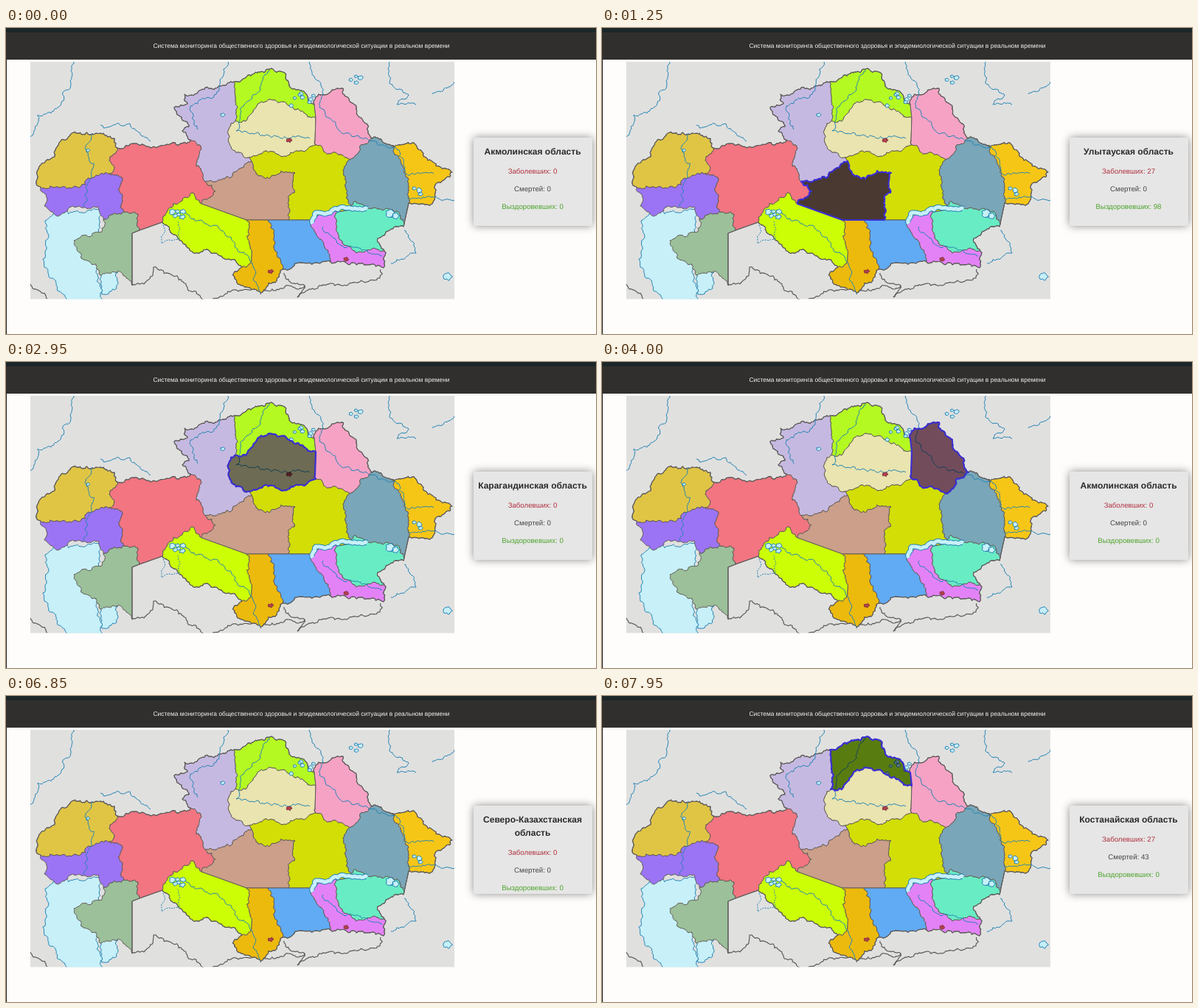
Recreate the animation shown at these times as an HTML page. Size 800x416 px, loop 8000 ms.

```html
<!DOCTYPE html>
<html lang="ru">
<head>
<meta charset="utf-8">
<style>
html, body { margin: 0; width: 100%; height: 100%; overflow: hidden; background: #fefdfc; }
svg { display: block; width: 800px; height: 416px; }
text { font-family: "Liberation Sans", Arial, sans-serif; font-size: 9.67px; text-anchor: middle; text-rendering: geometricPrecision; }
path { stroke-linejoin: round; }
.header { font-size: 8.475px; fill: #f4f3f1; }
.title { font-size: 12px; font-weight: bold; fill: #2a2a2a; }
.region { stroke: #625c58; stroke-width: 1; }
.border { fill: none; stroke: #5d5b5a; stroke-width: 1.2; }
.river { fill: none; stroke: #2383b3; stroke-width: 1; }
.water { fill: #c7f0f9; stroke: #2383b3; stroke-width: 1; }
.shore { fill: none; stroke: #2383b3; stroke-width: 7; }
.strait { fill: none; stroke: #c7f0f9; stroke-width: 5; }
.city { fill: #b0404a; stroke: #7a3038; stroke-width: .8; }
.hover { fill: #000; stroke: #3b2fd0; stroke-width: 2.2; }
#panel { fill: #e6e6e6; filter: drop-shadow(0 0 6px rgba(0, 0, 0, .45)); }
</style>
</head>
<body>
<svg viewBox="0 0 800 416">
  <clipPath id="frame"><rect x="33" y="46" width="575" height="322.5"/></clipPath>
  <rect width="800" height="6" fill="#1c2729"/>
  <rect y="6" width="800" height="37" fill="#312f2d"/>
  <rect y="43" width="1" height="373" fill="#1e1e1e"/>
  <text class="header" x="400.5" y="27">Система мониторинга общественного здоровья и эпидемиологической ситуации в реальном времени</text>
  <g id="map" clip-path="url(#frame)"><rect x="33" y="46" width="575" height="323" fill="#e0e0df"/></g>
  <rect id="panel" x="634" y="149" width="161" height="120" rx="3"/>
  <text class="title" x="714" y="172" id="name"></text>
  <text class="title" x="714" y="190" id="name2"></text>
  <g id="stats">
    <text x="714" y="197.5" fill="#b0303f"></text>
    <text x="714" y="221.5" fill="#444"></text>
    <text x="714" y="245.5" fill="#4da32b"></text>
  </g>
</svg>
<script>
const $ = id => document.getElementById(id);
const map = $('map');

let seed = 11;
const rnd = () => (seed = seed * 16807 % 2147483647) / 2147483647 - .5;
const parse = s => s.split(' ').map(p => p.split(',').map(Number));

// Midpoint displacement turns a few key points into a natural coastline
function split(a, b) {
  const dx = b[0] - a[0], dy = b[1] - a[1], len = Math.hypot(dx, dy);
  if (len < 3.5) return [b];
  const k = rnd() * Math.min(.55, 6 / len);
  const m = [(a[0] + b[0]) / 2 - dy * k, (a[1] + b[1]) / 2 + dx * k];
  return [...split(a, m), ...split(m, b)];
}
const roughen = p => p.flatMap((b, i) => i ? split(p[i - 1], b) : [b]);
const toPath = pts => 'M' + pts.map(p => p.map(v => v.toFixed(1))).join('L');
const rough = s => toPath(roughen(parse(s)));

function draw(cls, d, fill) {
  const el = document.createElementNS('http://www.w3.org/2000/svg', 'path');
  el.setAttribute('class', cls);
  el.setAttribute('d', d);
  if (fill) el.setAttribute('fill', fill);
  return map.appendChild(el);
}

// Points where borders meet
const nodes = {
  A: '47,216', B: '151,163', C: '140,198', D: '160,250', E: '132,260', F: '181,275', G: '212,264', H: '250,152',
  I: '270,209', J: '265,239', K: '309,73', L: '310,127', M: '330,176', N: '333,181', O: '326,261', P: '355,261',
  Q: '383,261', R: '418,104', S: '420,122', T: '419,153', U: '470,177', V: '497,150', W: '523,160', X: '546,238',
  Y: '468,247', Z: '539,270', a: '413,261', b: '450,250', c: '513,303', d: '442,320', e: '375,328', f: '320,325',
  g: '70,256', m: '171,350', n: '171,279', t: '605,196'
};
// Key points of the rough borders; every other border is a straight line
const bends = {
  AB: '41,209 47,186 66,175 74,154 97,143 122,143 147,150', BC: '140,180 147,189', CA: '112,204 108,213 72,217',
  Ag: '55,230 52,242', gE: '86,244 125,243', ED: '143,254', CD: '157,203', DF: '179,253',
  mE: '158,334 126,334 122,321 104,314 92,289 130,277', BH: '175,157 202,162 245,157', HI: '264,160 258,188',
  IJ: '284,222', JG: '252,224 220,246', HK: '239,140 248,134 228,108 246,103 242,90 278,82', KL: '311,100',
  LM: '303,135 304,160', NI: '303,204', NQ: '336,193 357,205 373,194 392,197 391,224 383,234',
  KR: '328,64 357,56 378,61 384,79 404,86', SL: '395,110 365,98 346,100 333,116 325,127',
  TM: '420,159 382,173 352,167', RV: '420,94 457,82 475,110', TU: '440,171', UV: '480,160', UY: '457,193 462,232',
  VW: '510,154', WX: '536,185 546,206', YZ: '471,237 495,246 530,249', Wt: '553,156 572,180', tX: '582,213 578,239',
  ba: '425,248', Zc: '520,275 504,286', bc: '451,285 470,302', cd: '512,326 470,319', da: '432,298 418,276',
  de: '398,319', eP: '368,305', ef: '345,360 310,341 310,331', fO: '333,316 330,290', Gf: '250,303 283,306'
};
const arcs = {};
for (const k in bends) arcs[k] = roughen(parse(`${nodes[k[0]]} ${bends[k]} ${nodes[k[1]]}`));

const side = (p, q) => arcs[p + q] || arcs[q + p]?.slice().reverse() || parse(`${nodes[p]} ${nodes[q]}`);
const ring = s => toPath([...s].slice(1).flatMap((q, i) => side(s[i], q)));

const regions = {
  west: ['#e0c545', 'ABCA'],
  atyrau: ['#9b74f5', 'AgEDCA'],
  mangystau: ['#9bc09a', 'EDFnmE'],
  aktobe: ['#f27581', 'BHIJGFDCB'],
  kostanay: ['#c6b9e1', 'HKLMNIH'],
  north: ['#b4fa22', 'KRSLK'],
  akmola: ['#e9e4b0', 'LSTML'],
  pavlodar: ['#f6a2c5', 'RVUTSR'],
  karaganda: ['#d2de06', 'MTUYbaQNM'],
  ulytau: ['#cb9f89', 'NQPOJIN'],
  abai: ['#79a6b8', 'VWXZYUV'],
  east: ['#f6c617', 'WtXW'],
  kyzylorda: ['#ccfe06', 'GfOJG'],
  turkestan: ['#ecba0d', 'OPefO'],
  zhambyl: ['#60abf3', 'QadePQ'],
  almaty: ['#e382f6', 'bcdab'],
  jetisu: ['#68ecc4', 'YZcbY']
};

// Sea and its eastern bay, partly covered by the land
draw('water', rough('70,250 130,250 124,335 130,372 82,372 52,325 58,282 53,262 70,250'));
draw('water', rough('128,330 152,332 150,354 130,362 128,330'));

// Neighbouring frontiers
['171,350 187,348 200,325 240,345 268,369', '33,348 56,368', '280,368 315,358 337,355',
  '345,362 378,352 405,350 395,366', '377,333 385,345 405,350', '508,328 507,340 425,350 395,366'
].forEach(s => draw('border', rough(s)));

const shapes = {};
for (const k in regions) {
  shapes[k] = ring(regions[k][1]) + 'Z';
  draw('region', shapes[k], regions[k][0]);
}
draw('border', ring('ABHKRVWtXZcdefGFnm'));

['92,46 88,75 70,108 43,118 33,148', '118,143 108,160 120,185 106,243', '128,132 168,130 196,154',
  '301,46 285,90 250,106 260,138', '357,57 345,84 318,112 312,140 366,147 412,150',
  '411,46 430,90 425,108 460,143 530,165 545,200 580,198', '521,46 520,75 546,91 530,104 556,104', '608,73 578,90',
  '240,252 288,271 330,314 345,360', '430,270 455,296 510,310', '546,230 608,234', '540,275 556,306 522,320'
].forEach(s => draw('river', rough(s)));
draw('river', rough('213,268 211,293 236,286 232,262')).style.strokeDasharray = '2 1.5';

const lake = rough('416,266 420,251 450,247 490,246');
draw('shore', lake);
draw('strait', lake);

const blob = (x, y, r) => rough([0, 1, 2, 3, 4, 0].map(i =>
  `${x + r * Math.cos(i * 1.257)},${y + r * .8 * Math.sin(i * 1.257)}`).join(' '));

// Groups of lakes: centre, spread, count, size
[[230, 252, 20, 6, 4], [398, 96, 38, 8, 2.5], [527, 253, 14, 3, 5], [555, 222, 14, 3, 4], [474, 70, 16, 4, 3],
  [598, 338, 2, 1, 5], [294, 118, 1, 1, 3], [111, 166, 1, 1, 2]
].forEach(([x, y, spread, count, size]) => {
  while (count--) draw('water', blob(x + rnd() * spread, y + rnd() * spread * .6, size * (1 + rnd() * .6)));
});
draw('city', blob(384, 153, 4) + blob(359, 331, 4) + blob(461, 314, 3.5));

// Hover spans: start, end, region, darkness, fade-out time
const hovers = [
  [600, 1700, 'ulytau', .64],
  [1700, 2700, 'karaganda'],
  [2700, 3800, 'akmola'],
  [3800, 4700, 'pavlodar'],
  [4700, 6840, 'north', .5, 1],
  [6950, 7750, 'kostanay'],
  [7750, 8300, 'north', .5]
].map(([from, to, key, dark = .53, out = 200]) => {
  const el = draw('hover', shapes[key]);
  el.style.fillOpacity = dark;
  return { from, to, out, el };
});

// The panel follows the pointer with a delay
const panels = [
  [0, 'Акмолинская'], [1150, 'Улытауская'], [2350, 'Карагандинская'], [3500, 'Акмолинская'],
  [4250, 'Павлодарская'], [5400, 'Северо-Казахстанская'], [7150, 'Акмолинская'], [7550, 'Костанайская']
];
const counts = { 'Улытауская': [27, 0, 98], 'Костанайская': [27, 43, 0] };
const labels = ['Заболевших', 'Смертей', 'Выздоровевших'];
const stats = [...$('stats').children];
const clamp = v => Math.max(0, Math.min(1, v));

function render() {
  const t = performance.now() % 8000;
  for (const h of hovers)
    h.el.style.opacity = Math.min(clamp((t - h.from) / 200), 1 - clamp((t - h.to) / h.out));
  const name = panels.findLast(p => p[0] <= t)[1];
  const wraps = name.length > 15;
  $('name').textContent = wraps ? name : name + ' область';
  $('name2').textContent = wraps ? 'область' : '';
  $('stats').setAttribute('transform', `translate(0 ${wraps ? 18 : 0})`);
  stats.forEach((el, i) => el.textContent = `${labels[i]}: ${counts[name]?.[i] ?? 0}`);
  requestAnimationFrame(render);
}
render();
</script>
</body>
</html>
```
